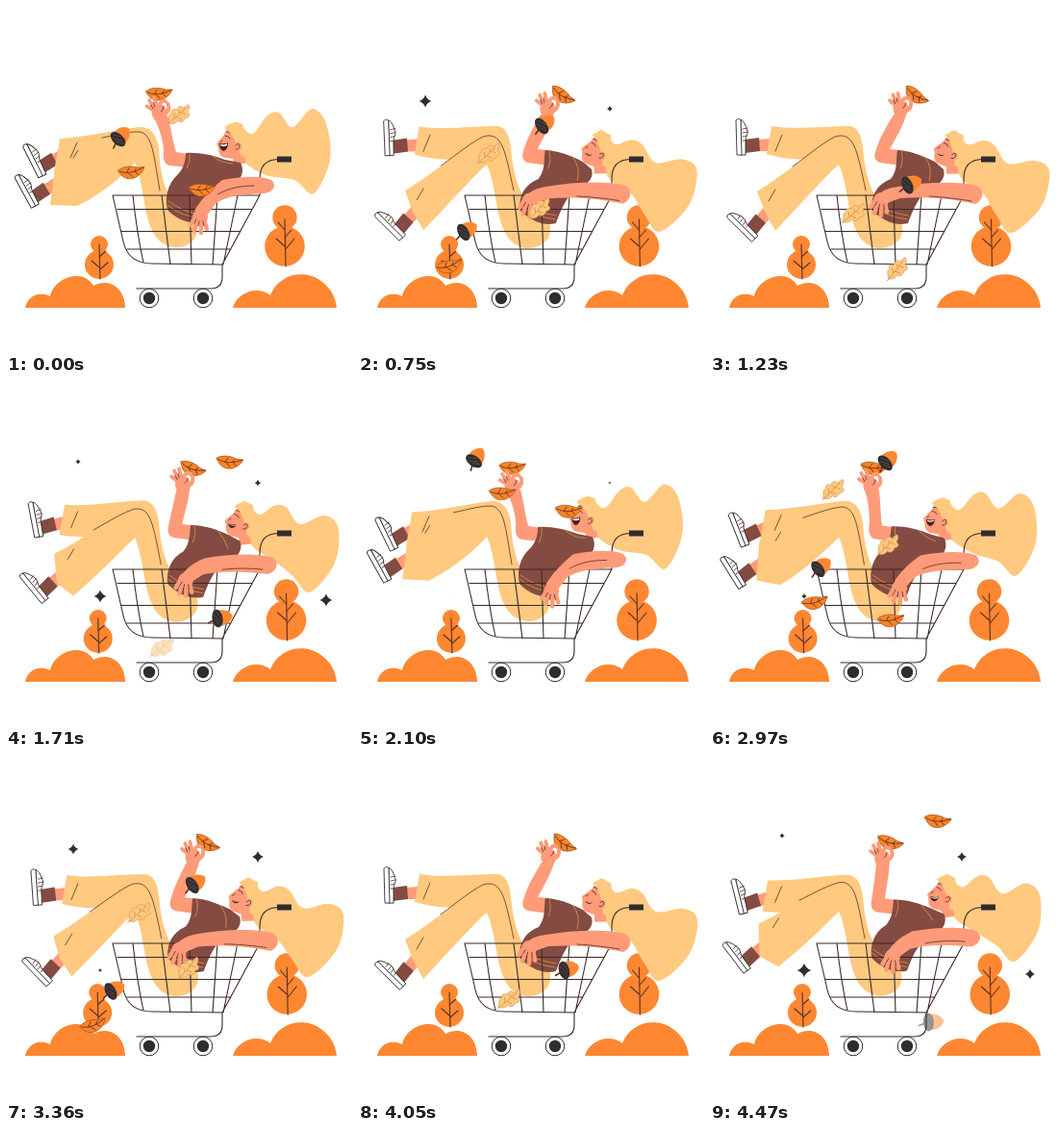
These frames come from a looping animation (360x360 px, 4500 ms). An HTML page:

```html
<!DOCTYPE html>
<html lang="en">
<head>
<meta charset="utf-8">
<title>Autumn cart</title>
<style>
html, body { margin: 0; width: 100%; height: 100%; overflow: hidden; background: #fff; }
svg { display: block; width: 100%; height: 100%; }
.orange { fill: #ff8731; }
.cream { fill: #ffc97f; }
.skin { fill: #ff9b78; }
.brown { fill: #844b42; }
.dark { fill: #2e2d31; }
.line, .cart, .finger, .gold { fill: none; stroke-linecap: round; stroke-linejoin: round; }
.line { stroke: #5a2f29; stroke-width: .8; }
.cart { stroke: #3b2928; stroke-width: 1.1; }
.finger { stroke: #ff9b78; stroke-width: 4.4; }
.gold { stroke: #c98a45; stroke-width: 1; }
.shoe { fill: #fff; stroke: #2e2d31; stroke-width: .9; stroke-linejoin: round; }
</style>
</head>
<body>
<svg viewBox="0 0 360 360">
<defs>
  <g id="leaf">
    <path d="M-14 -3C-8 -8 2 -7 7 -5L14 -5C11 2 4 7 -3 6C-9 5 -11 1 -14 -3Z" fill="#fb8426" stroke="#a8521b" stroke-width=".7"/>
    <path class="line" d="M-12 -2C-4 1 4 0 13 -5M-5 0L-2 -5M-3 0L1 4M3 -1L5 -4M4 -1L7 2"/>
  </g>
  <g id="oak">
    <path d="M-12 7C-10 2 -12 -1 -8 -2C-8 -6 -4 -7 -2 -5C0 -9 4 -9 5 -6L11 -9C13 -5 10 -4 9 -1C12 1 10 5 6 4C4 8 0 9 -2 6C-5 9 -9 9 -12 7Z" fill="#ffc97f" stroke="#d99850" stroke-width=".7"/>
    <path d="M-14 9C-6 4 0 0 8 -6M-5 3L-5 -2M-3 2L2 5M1 -1L1 -5M3 -2L7 1" fill="none" stroke="#d58b45" stroke-width=".8"/>
  </g>
  <g id="acorn">
    <path class="line" d="M-9 1L-15 3" style="stroke-width:1.6"/>
    <path class="orange" d="M-5 -8C2 -9 9 -6 11 0C9 6 2 9 -5 8Z"/>
    <ellipse class="dark" cx="-5" rx="5.5" ry="9.5"/>
    <path class="line" d="M-8 -5L-3 4M-8 0L-4 7M-5 -7L-1 1" style="stroke:#6b4a42"/>
  </g>
  <g id="foot">
    <path class="skin" d="M5 -6L19 -7L19 6L5 6Z"/>
    <path class="brown" d="M-8 -6L7 -8L8 6L-8 8Z"/>
    <path class="shoe" d="M-12 -27C-8 -25 -7 -20 -5 -15C-4 -12 -7 -9 -7 -6L-7 10L-12 10Z"/>
    <path class="shoe" d="M-17 -26C-15 -28 -13 -28 -12 -26L-11 10L-16 10Z"/>
    <path class="line" d="M-10 -17L-5 -18M-10 -13L-5 -14M-10 -9L-6 -10M-10 -5L-7 -5"/>
  </g>
  <path id="star" class="dark" d="M0 -1Q.25 -.25 1 0Q.25 .25 0 1Q-.25 .25 -1 0Q-.25 -.25 0 -1Z"/>
</defs>

<path class="orange" d="M20 314C22 302 34 296 46 302C50 283 79 272 91 291C108 282 124 294 124 314Z"/>
<path class="orange" d="M236 314C240 299 261 290 275 301C284 278 312 273 329 287C338 294 343 303 344 314Z"/>

<g data-a="translate(97 269)" data-b="translate(95 269)">
  <circle class="orange" cy="-21" r="9"/><circle class="orange" r="15"/>
  <path class="line" d="M0 -21L1 15M0 -8L7 -14M0 3L-8 -4M1 5L9 -2" style="stroke-width:1.1"/>
</g>
<g data-a="translate(290 250)" data-b="translate(292.5 250)">
  <circle class="orange" cy="-30" r="12.7"/><circle class="orange" r="20.8"/>
  <path class="line" d="M0 -28L1 21M0 -17L-7 -25M0 -9L7 -17M0 0L-9 -8M1 3L10 -8" style="stroke-width:1.1"/>
</g>

<path class="cream" data-smooth
  data-a="233 126 241 121 256 133 272 114 284 111 298 126 318 107 333 122 337 160 320 195 300 181 270 176 246 160 240 140"
  data-b="248 135 256 130 268 144 284 140 296 145 310 164 338 161 353 172 345 208 314 236 298 218 284 195 262 180 252 155"/>

<g data-a="translate(44 163) rotate(-25)" data-b="translate(44 145) rotate(0)"><use href="#foot"/></g>
<path class="cream"
  data-a="M56 138C85 136 115 129 138 126C152 125 157 136 159 148C160 168 163 184 170 198L198 222L160 240C150 200 146 175 140 155C110 165 80 172 50 174Z"
  data-b="M64 125C90 129 115 125 145 125C155 126 158 138 159 148C161 168 164 184 172 198L200 222L160 240C150 200 146 175 140 148C110 162 86 162 59 154Z"/>
<g data-a="translate(36 194) rotate(-27)" data-b="translate(48 227) rotate(-44)"><use href="#foot"/></g>
<path class="cream"
  data-a="M52 160C80 150 110 135 138 130C150 132 152 140 156 155C157 175 160 195 198 228C202 245 186 252 176 251C156 249 150 232 146 215C142 195 140 175 134 163C128 170 104 194 74 208L46 207Z"
  data-b="M49 193C70 180 95 160 125 139C145 130 152 140 156 155C157 175 160 195 200 228C202 246 188 252 176 252C156 250 150 232 146 215C142 195 140 178 134 165C125 172 100 200 68 234L57 214Z"/>
<path class="line"
  data-a="M100 137C115 134 130 130 140 131C152 135 153 150 160 192M74 142L67 158M75 150L70 158"
  data-b="M86 167C105 153 118 142 130 136C150 130 153 150 162 192M75 134L68 151M68 191L61 203"/>

<g data-a="translate(232 141) rotate(0)" data-b="translate(246 149) rotate(13)">
  <path class="skin" d="M5 -18C-1 -15 -3 -11 -5 -7L-12 1C-14 3 -11 5 -11 7C-11 13 -8 17 -2 17L4 18L6 25L18 22L13 9C15 0 14 -12 5 -18Z"/>
  <path class="cream" d="M-5 -14C-1 -19 6 -21 14 -18L20 12L13 16C11 11 10 6 7 1C5 -4 2 -9 -5 -14Z"/>
  <circle class="skin" cx="9" cy="5" r="4"/>
  <path class="line" d="M-4 -6Q0 -6 1 -3M-3 -10Q0 -11 1 -9M-7 -1L-9 1M7 4Q11 0 11 5Q10 9 7 8"/>
  <g data-a="translate(-6 5) scale(1 1)" data-b="translate(-5 7) scale(.8 .2)">
    <path d="M-4 -3Q2 -2 5 -4Q5 4 0 5Q-4 3 -4 -3Z" fill="#4b211f"/>
    <path d="M-3 -2Q2 -1 4 -3L4 -1Q0 1 -3 -1Z" fill="#fff"/>
  </g>
</g>

<path class="skin"
  data-a="M190 168L170 166C164 164 163 158 164 150C163 138 160 128 154 117L168 114C172 128 173 140 177 152L190 154Z"
  data-b="M199 166L177 163C171 161 170 156 173 149C177 136 184 125 191 113L205 111C200 127 193 138 187 149L199 150Z"/>
<path class="brown"
  data-a="M187 153C200 152 215 155 228 160L244 163C250 175 242 186 226 192C212 200 208 215 204 225C190 228 175 220 168 212C165 200 168 185 178 176C184 170 187 162 187 153Z"
  data-b="M195 150C206 150 220 155 234 162L243 170C246 180 238 187 226 191C216 200 210 215 206 226C192 230 178 222 168 212C168 197 173 186 188 180C196 170 193 160 195 150Z"/>
<path class="gold"
  data-a="M191 154Q192 162 188 169M168 207Q182 219 204 221M169 203Q184 215 205 217M216 157Q222 163 236 164"
  data-b="M199 151Q202 160 198 169M169 207Q182 219 205 222M170 203Q184 215 206 218M224 158Q232 168 228 182"/>

<g data-a="translate(159 92) rotate(0)" data-b="translate(213.5 94) rotate(38)"><use href="#leaf"/></g>
<g data-a="translate(160 117) rotate(-6)" data-b="translate(198 113) rotate(4)">
  <ellipse class="skin" cy="-6" rx="8" ry="9"/>
  <path class="finger" d="M-4 -8L-12 -14M-4 -9L-9 -20M-1 -11L-4 -22M0 -12Q3 -20 8 -17M3 -3Q12 -6 10 -14" style="stroke-width:3.8"/>
  <path class="line" d="M-6 -11L-8 -15M-4 -13L-5 -17M2 -7Q5 -9 5 -12"/>
</g>

<path class="cart" d="M111 197H264M111 197L122 245Q127 268 152 268L225 269L264 197V180Q264 160 283 159.5
  M116 211.500H256M120 234.500H244M126 253H234M132 197Q136 235 143 267M162 197L171 269M191 197L193 269M220 197L215 269M241 197L226 269
  M225 269V282Q225 294 213 294H136"/>
<rect class="dark" x="282" y="156.500" width="15" height="6"/>
<g id="wheels"></g>

<path class="skin"
  data-a="M225 181C245 177 265 176 276 181C283 187 277 195 266 195C245 196 228 198 218 206L209 218L196 213C204 200 214 190 225 181Z"
  data-b="M196 188C225 183 260 182 278 187C286 192 285 202 276 206C255 201 225 198 198 200L184 205L175 197C180 191 187 189 196 188Z"/>
<path class="line" data-a="M220 196C232 189 245 187 258 187" data-b="M228 198C245 199 260 201 272 203"/>
<g data-a="translate(202 220) rotate(0)" data-b="translate(178 202) rotate(4)">
  <ellipse class="skin" rx="8" ry="8"/>
  <path class="finger" d="M-5 -1L-10 8M-3 3L-6 14M1 3L1 16M4 2L7 12"/>
  <path class="line" d="M-6 6L-4 2M-2 9L-1 4M4 9L3 4"/>
</g>
<g id="stars"></g>
<g id="falls"></g>
</svg>
<script>
const LOOP = 4500, SWAY = 2700, LIFE = 1800;
const $ = q => document.querySelector(q);
const clamp = v => Math.max(0, Math.min(1, v));
const ease = v => v * v * (3 - 2 * v);
const NUM = /-?(?:\d+\.?\d*|\.\d+)/g;

function add(parent, name, attrs) {
  const el = document.createElementNS("http://www.w3.org/2000/svg", name);
  for (const k in attrs) el.setAttribute(k, attrs[k]);
  return parent.appendChild(el);
}

for (const cx of [149, 205]) {
  add($("#wheels"), "circle", { cx, cy: 304, r: 9.8, fill: "#fff", stroke: "#3b2928" });
  add($("#wheels"), "circle", { cx, cy: 304, r: 6.2, class: "dark" });
}

// Every element with two poses is blended number by number.
const parts = [...document.querySelectorAll("[data-a]")].map(el => ({
  el,
  attr: el.tagName === "path" ? "d" : "transform",
  smooth: "smooth" in el.dataset,
  a: el.dataset.a,
  b: el.dataset.b.match(NUM).map(Number)
}));

function blend(a, b, p) {
  let i = 0;
  return a.replace(NUM, n => " " + (+n + (b[i++] - n) * p).toFixed(2));
}

// Closed Catmull-Rom curve through "x y x y ..."
function curve(text) {
  const v = text.trim().split(/\s+/).map(Number), n = v.length / 2;
  const at = i => { const k = (i + n) % n * 2; return [v[k], v[k + 1]]; };
  let d = "M" + at(0);
  for (let i = 0; i < n; i++) {
    const [o, s, e, f] = [at(i - 1), at(i), at(i + 1), at(i + 2)];
    d += "C" + [0, 1].map(k => s[k] + (e[k] - o[k]) / 6) + " " +
      [0, 1].map(k => e[k] - (f[k] - s[k]) / 6) + " " + e;
  }
  return d + "Z";
}

// x, y, radius, then pairs of peak time and half width
const stars = [
  [262, 107, 7.3, 620, 220, 1870, 290],
  [70, 99, 6.8, 730, 350],
  [98, 225, 7.5, 450, 290, 1760, 350],
  [333, 229, 7, 1690, 330],
  [75, 85, 3, 1740, 300],
  [324, 248, 1.2, 2550, 150]
].map(s => ({ s, el: add($("#stars"), "use", { href: "#star" }) }));

// shape, x, y, sideways speed, tilt, turn per second, start times
const falls = [
  ["acorn", 125, 54, -.008, -60, 22, [-620, 1900]],
  ["acorn", 179, 54, .031, -50, 27, [230, 2750]],
  ["oak", 175, 58, .012, -4, -8, [-420, 2100]],
  ["oak", 116, 54, .027, -12, 5, [-10, 2510]],
  ["leaf", 168, 69, -.047, 6, -12, [-800, 1720]],
  ["leaf", 241, 54, -.035, 10, -9, [-1056, 1464, 4344]]
].map(f => ({ f, el: add($("#falls"), "use", { href: "#" + f[0] }) }));

function draw(t) {
  const u = ((t + 250) % SWAY) / (SWAY / 2);
  const swing = clamp((u < 1 ? u : 2 - u) * 1.25 - .125);
  const p = ease(ease(swing));
  for (const { el, attr, smooth, a, b } of parts) {
    const v = blend(a, b, p);
    el.setAttribute(attr, smooth ? curve(v) : v);
  }

  for (const { s: [x, y, r, ...peaks], el } of stars) {
    let size = 0;
    for (let i = 0; i < peaks.length; i += 2)
      size = Math.max(size, 1 - Math.abs(t % SWAY - peaks[i]) / peaks[i + 1]);
    el.setAttribute("transform", `translate(${x} ${y}) scale(${r * size})`);
  }

  for (const { f: [, x, y, vx, tilt, turn, starts], el } of falls) {
    const age = t - starts.filter(s => s <= t).pop();
    const seen = clamp((age - 60) / 60) * clamp((LIFE - age) / 150);
    el.setAttribute("opacity", seen || 0);
    if (seen) el.setAttribute("transform",
      `translate(${x + vx * age} ${y + .1305 * age}) rotate(${tilt + turn * age / 1000})`);
  }
}

const start = performance.now();
(function tick() {
  draw((performance.now() - start) % LOOP);
  requestAnimationFrame(tick);
})();
</script>
</body>
</html>
```
